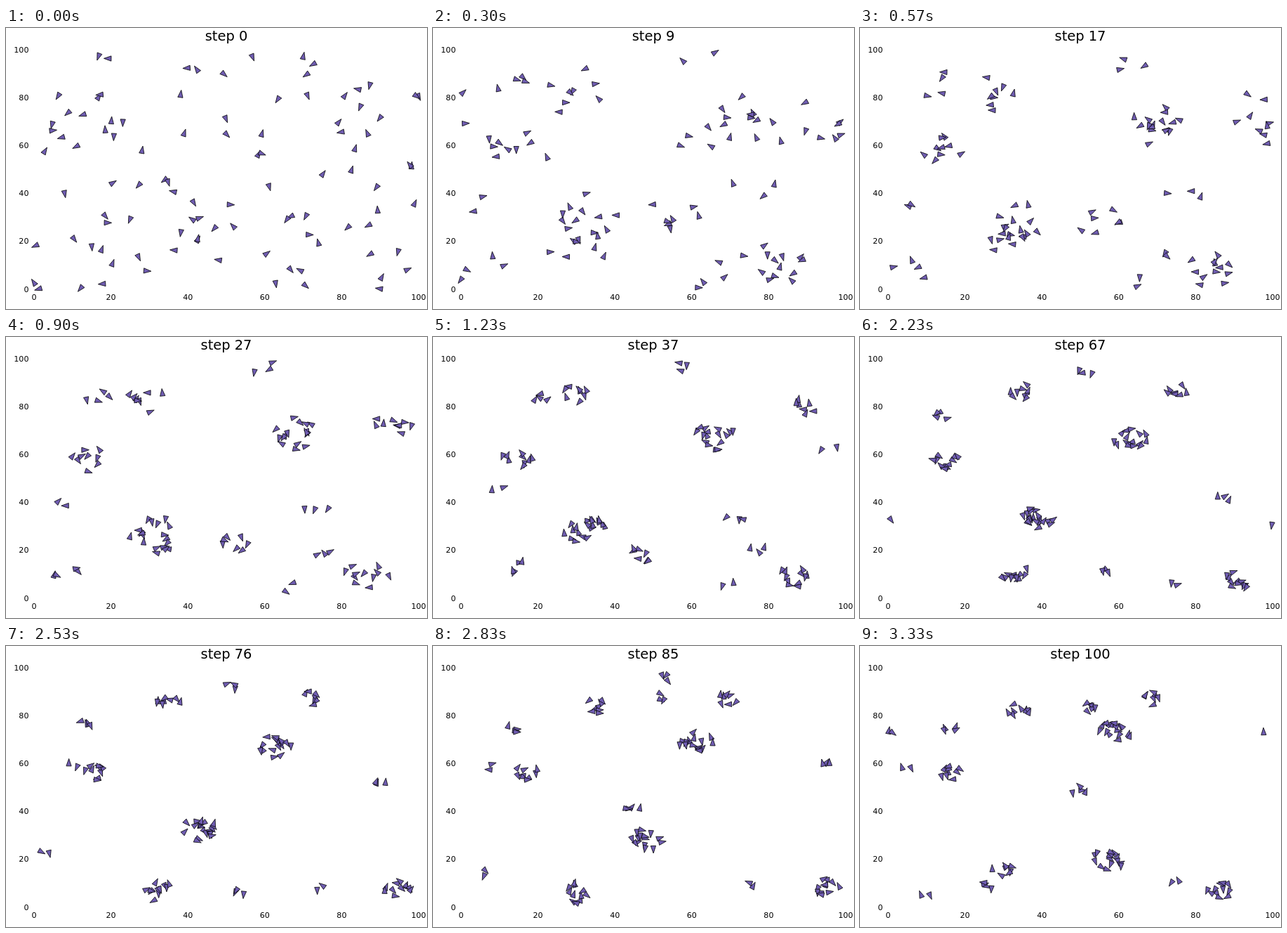
Write an HTML page with a canvas that moves like this. It is 600x400 px and loops after 3360 ms.

```html
<!DOCTYPE html>
<html lang="en">
<head>
<meta charset="utf-8">
<title>Flocking</title>
<style>
  html, body { margin: 0; width: 100%; height: 100%; overflow: hidden; background: #fff; }
  canvas { display: block; }
</style>
</head>
<body>
<canvas id="stage" width="600" height="400"></canvas>
<script>
const ctx = document.getElementById('stage').getContext('2d');
const LOOP = 3360, LAST_STEP = 100, GATHERED = 17, SIZE = 4.2;

// Each flock: bird count, then the waypoints of its centre (x, y), evenly
// spaced in time from GATHERED to LAST_STEP. Space wraps at 100.
const flocks = [
  [9, 14, 58, 17, 56],
  [16, 70, 69, 64, 67, 63, 66.5, 59, 73],
  [15, 31, 22, 32, 27, 33, 32, 39, 34, 47, 29, 57, 20],
  [4, 33, 33, 34, 31, 40, 34, 49.5, 48],
  [11, 84, 8, 87, 9, 86, 10, 91, 8, 95.5, 8, 86.5, 7.5],
  [8, 28, 82, 30, 86, 35, 86, 34, 82],
  [4, 14, 84, 22, 81, 13, 76, 16.5, 75],
  [7, 95, 67, 86, 84, 73, 87, 68, 87],
  [7, 56, 29, 49, 19, 38, 16, 34, 11, 30, 3.5, 30, 15.5],
  [4, 5, 8, 18, 14, 33, 9, 25, 8],
  [3, 76, 42, 68, 28, 54.5, 9, 52, -16],
  [3, 74, 13, 83.5, 33.5, 99, 73],
  [3, 63, 95, 52, 97, 52, 84],
  [2, 96, 80, 98, 40, 110, 5],
  [2, 66, 5, 74, 6, 75, 10],
  [2, 6, 34, 13, 57, 5, 58]
];

let seed = 71;
function random() {
  seed = (seed + 0x6D2B79F5) | 0;
  let t = Math.imul(seed ^ (seed >>> 15), 1 | seed);
  t = (t + Math.imul(t ^ (t >>> 7), 61 | t)) ^ t;
  return ((t ^ (t >>> 14)) >>> 0) / 4294967296;
}

const wrap = v => ((v % 100) + 100) % 100;
const toX = x => 40 + 5.48 * x;
const toY = y => 371.5 - 3.405 * y;

function catmullRom(a, b, c, d, t) {
  return b + 0.5 * t * (c - a + t * (2 * a - 5 * b + 4 * c - d + t * (3 * (b - c) + d - a)));
}

function centre(path, step) {
  const last = path.length - 1;
  const u = Math.max(0, (step - GATHERED) / (LAST_STEP - GATHERED)) * last;
  const i = Math.min(Math.floor(u), last - 1);
  const at = j => path[Math.max(0, Math.min(last, j))];
  return [0, 1].map(k =>
    catmullRom(at(i - 1)[k], at(i)[k], at(i + 1)[k], at(i + 2)[k], u - i));
}

const birds = flocks.flatMap(([count, ...coords]) => {
  const path = [];
  for (let i = 0; i < coords.length; i += 2) path.push([coords[i], coords[i + 1]]);
  return Array.from({ length: count }, (_, i) => {
    const radius = 1.3 * Math.sqrt(count) * Math.sqrt((i + 0.3 + 0.7 * random()) / count);
    const side = random() < 0.5 ? -1 : 1;
    return {
      path, radius,
      phase: i * 2.4 + random(),
      spin: side * 0.8 / Math.max(radius, 1.6),
      scatter: (12 + 0.5 * count) * Math.sqrt(random()),
      from: i * 2.4 + random() * 2
    };
  });
});

// Birds circle their flock's centre after gathering from a scattered start.
function position(bird, step) {
  const [x, y] = centre(bird.path, step);
  const angle = bird.phase + bird.spin * step;
  const radius = bird.radius * (0.85 + 0.7 * Math.exp(-step / 25));
  const away = bird.scatter * Math.exp(-step / 14);
  return [
    x + radius * Math.cos(angle) + away * Math.cos(bird.from),
    y + radius * Math.sin(angle) + away * Math.sin(bird.from)
  ];
}

function drawBird(bird, step) {
  const [x, y] = position(bird, step);
  const [x0, y0] = position(bird, step - 0.5);
  const [x1, y1] = position(bird, step + 0.5);
  const heading = Math.atan2(y1 - y0, x1 - x0);
  const px = toX(wrap(x)), py = toY(wrap(y));
  ctx.beginPath();
  for (let i = 0; i < 3; i++) {
    const a = heading + i * 2 * Math.PI / 3;
    const r = SIZE * (i ? 1 : 2);
    ctx.lineTo(px + r * Math.cos(a), py - r * Math.sin(a));
  }
  ctx.closePath();
  ctx.fill();
  ctx.stroke();
}

function label(text, x, y, size, align) {
  ctx.font = `${size}px "DejaVu Sans", sans-serif`;
  ctx.textAlign = align;
  ctx.fillText(text, x, y);
}

function draw(step) {
  ctx.fillStyle = '#fff';
  ctx.fillRect(0, 0, 600, 400);
  ctx.fillStyle = '#000';
  label(`step ${step}`, 314, 18, 19.44, 'center');
  for (let v = 0; v <= 100; v += 20) {
    label(v, toX(v), 387, 11.11, 'center');
    label(v, 32.5, toY(v) + 4, 11.11, 'right');
  }
  ctx.fillStyle = '#705db2';
  ctx.strokeStyle = '#000';
  ctx.lineWidth = 0.8;
  ctx.lineJoin = 'round';
  for (const bird of birds) drawBird(bird, step);
}

const start = performance.now();
let shown = -1;
function frame() {
  const time = (performance.now() - start) % LOOP;
  const step = Math.min(LAST_STEP, Math.floor((time + 5) * 0.03));
  if (step !== shown) draw(shown = step);
  requestAnimationFrame(frame);
}
frame();
</script>
</body>
</html>
```
